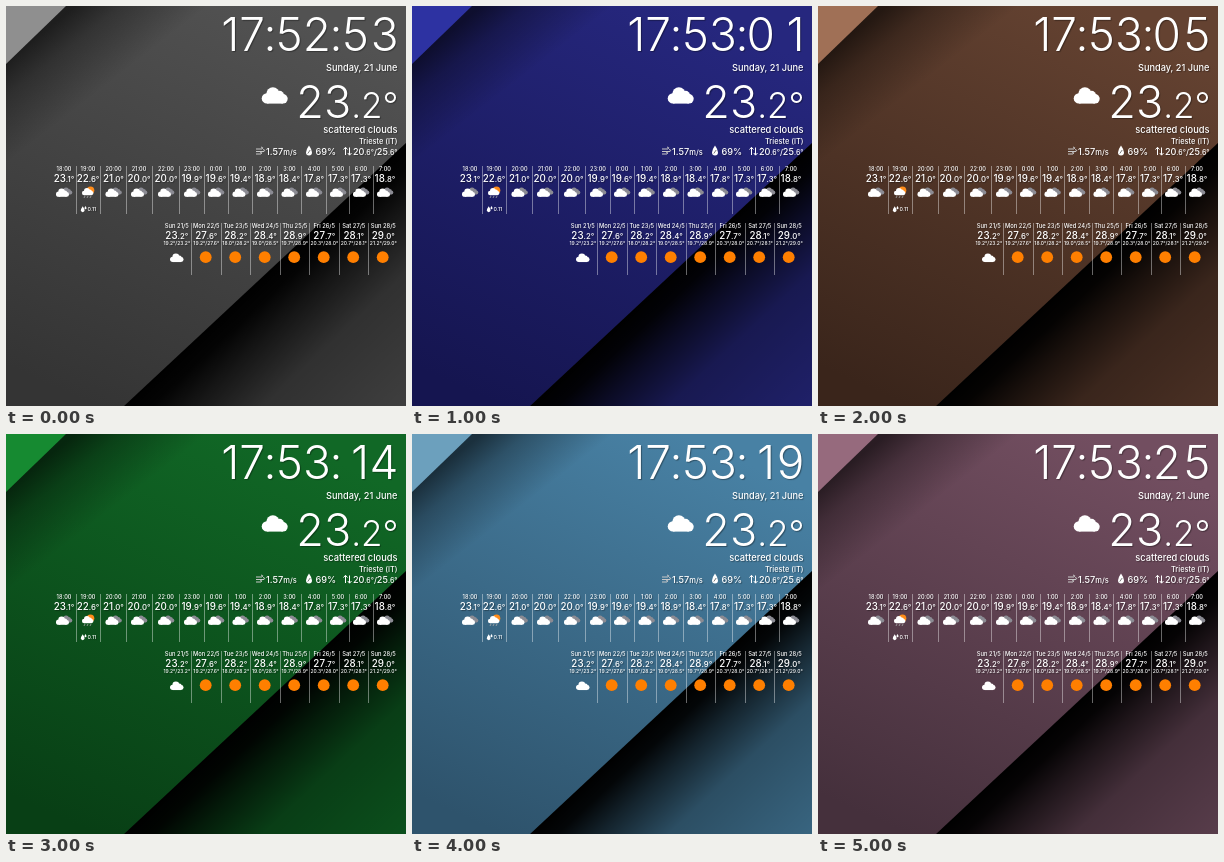
Animation of 400x400 px, one loop 6000 ms. Source, as an HTML page with a canvas:

```html
<!DOCTYPE html>
<html lang="en">
<head>
<meta charset="utf-8">
<title>Weather clock</title>
<style>
  html, body { margin: 0; width: 100%; height: 100%; overflow: hidden; background: #000; }
  canvas { display: block; width: 400px; height: 400px; }
</style>
</head>
<body>
<canvas id="stage" width="400" height="400"></canvas>
<script>
const ctx = document.getElementById('stage').getContext('2d');
const FAMILY = 'Inter, "Open Sans", sans-serif';
const STEP = 1000;

// Each scene: clock, then wallpaper colours for corner, band top, band bottom, lower right.
const scenes = [
  ['17:52:53', '#8f8f8f', '#525252', '#343434', '#3e3e3e'],
  ['17:53:01', '#2d32a2', '#26277e', '#151550', '#1f2068'],
  ['17:53:05', '#a07056', '#644231', '#3a251b', '#4a3024'],
  ['17:53:14', '#168a31', '#116826', '#083f15', '#0b4f1c'],
  ['17:53:19', '#6ca0bd', '#4881a4', '#2e536c', '#38647f'],
  ['17:53:25', '#966a7d', '#724e60', '#45303c', '#573c4a'],
];

const hourCenters = [58, 82, 107.5, 133, 160, 186, 210, 234.5, 259, 283.5, 308, 332, 355, 379];
const hourTemps = '23.1 22.6 21.0 20.0 20.0 19.9 19.6 19.4 18.9 18.4 17.8 17.3 17.3 18.8'.split(' ');
const days = [
  ['Sun 21/5', '23.2', '19.2°/23.2°'], ['Mon 22/5', '27.6', '19.2°/27.6°'],
  ['Tue 23/5', '28.2', '18.0°/28.2°'], ['Wed 24/5', '28.4', '19.0°/28.5°'],
  ['Thu 25/5', '28.9', '19.7°/28.9°'], ['Fri 26/5', '27.7', '20.3°/28.0°'],
  ['Sat 27/5', '28.1', '20.7°/28.1°'], ['Sun 28/5', '29.0', '21.2°/29.0°'],
];

function gradient(x0, y0, x1, y1, ...stops) {
  const g = ctx.createLinearGradient(x0, y0, x1, y1);
  for (const [at, color] of stops) g.addColorStop(at, color);
  return g;
}

const shade = alpha => `rgba(0,0,0,${alpha})`;

function polygon(fill, ...points) {
  ctx.fillStyle = fill;
  ctx.beginPath();
  for (const [x, y] of points) ctx.lineTo(x, y);
  ctx.fill();
}

function disc(x, y, r, color) {
  ctx.fillStyle = color;
  ctx.beginPath();
  ctx.arc(x, y, r, 0, Math.PI * 2);
  ctx.fill();
}

function text(str, x, y, size, align = 'right', weight = 450) {
  ctx.save();
  ctx.shadowColor = shade(.35);
  ctx.shadowOffsetX = ctx.shadowOffsetY = 1;
  ctx.shadowBlur = 1;
  ctx.font = `${weight} ${size}px ${FAMILY}`;
  ctx.textAlign = align;
  ctx.fillStyle = '#fff';
  ctx.fillText(str, x, y);
  ctx.restore();
}

// Runs of [string, size] on one baseline; anchor 0 = left, 0.5 = centre, 1 = right.
function runs(parts, x, y, anchor, weight = 450) {
  const widths = parts.map(([str, size]) => {
    ctx.font = `${weight} ${size}px ${FAMILY}`;
    return ctx.measureText(str).width;
  });
  x -= anchor * widths.reduce((a, b) => a + b);
  parts.forEach(([str, size], i) => {
    text(str, x, y, size, 'left', weight);
    x += widths[i];
  });
}

function degrees(value, big, small) {
  const [whole, tenth] = value.split('.');
  return [[whole, big], [`.${tenth}°`, small]];
}

function line(color, width, ...points) {
  ctx.strokeStyle = color;
  ctx.lineWidth = width;
  ctx.beginPath();
  for (const [x, y] of points) ctx.lineTo(x, y);
  ctx.stroke();
}

function divider(x, top, bottom) {
  line('rgba(255,255,255,.4)', 1, [Math.floor(x) + .5, top], [Math.floor(x) + .5, bottom]);
}

// Cloud centred on x, y; w is its full width.
function cloud(x, y, w, color) {
  ctx.save();
  ctx.translate(x, y);
  ctx.scale(w / 26, w / 26);
  disc(-7.8, 3, 5.2, color);
  disc(-1.8, -1.6, 6.6, color);
  disc(4.8, 0, 4.6, color);
  disc(8.2, 3.4, 4.8, color);
  ctx.fillRect(-7.8, 0, 16, 8.2);
  ctx.restore();
}

function drop(x, y, r) {
  ctx.fillStyle = '#fff';
  ctx.beginPath();
  ctx.moveTo(x, y - 2 * r);
  ctx.quadraticCurveTo(x + r, y - r * .6, x + r, y + r * .3);
  ctx.arc(x, y + r * .3, r, 0, Math.PI);
  ctx.quadraticCurveTo(x - r, y - r * .6, x, y - 2 * r);
  ctx.fill();
}

function wallpaper(corner, top, bottom, dark) {
  polygon(gradient(270, 0, 90, 400, [0, top], [1, bottom]), [0, 0], [400, 0], [400, 400], [0, 400]);
  polygon(gradient(24, 36, 74, 100, [0, shade(.6)], [.35, shade(.32)], [1, shade(0)]),
    [0, 0], [400, 0], [0, 400]);
  polygon(corner, [0, 0], [60, 0], [0, 58]);

  const lowerRight = [[400, 137], [400, 400], [118, 400]];
  polygon(dark, ...lowerRight);
  polygon(gradient(259, 268.5, 388, 407, [0, shade(1)], [.1, shade(.94)], [.25, shade(.65)],
    [.5, shade(.22)], [1, shade(0)]), ...lowerRight);
}

function clock(time) {
  const size = 46, base = 45.3, weight = 350;
  const [hours, minutes, seconds] = time.split(':');
  text(hours, 259, base, size, 'right', weight);
  text(minutes, 297.5, base, size, 'center', weight);
  for (const x of [264, 330]) text(':', x, base, size, 'center', weight);
  text(seconds[0], 363, base, size, 'right', weight);
  text(seconds[1], 392.5, base, size, 'right', weight);
}

function current() {
  text('Sunday, 21 June', 391.5, 64.8, 9.2);
  cloud(268.7, 89.4, 26, '#fff');
  runs(degrees('23.2', 45, 35), 392.5, 112, 1, 350);
  text('scattered clouds', 391.5, 126.8, 9.3);
  text('Trieste (IT)', 391.5, 138, 7.4);

  for (const [y, end] of [[143, 256], [145.5, 258], [148, 255]]) {
    line('#c8c8c8', 1, [250, y], [end, y], [end + .8, y - 1.2], [end - 1, y - 2]);
  }
  runs([['1.57', 9.2], ['m/s', 7.5]], 260, 148.6, 0);
  drop(303, 145.6, 3);
  line(shade(.65), .8, [301.8, 147.5], [304.2, 144]);
  text('69%', 309.5, 148.6, 9.2, 'left');
  line('#fff', 1, [339.5, 141.5], [339.5, 149]);
  line('#fff', 1, [337.5, 143.5], [339.5, 141.3], [341.5, 143.5]);
  line('#fff', 1, [343.5, 141.5], [343.5, 149]);
  line('#fff', 1, [341.8, 147], [343.5, 149.2], [345.5, 147]);
  runs([...degrees('20.6', 9.1, 7), ['/', 8], ...degrees('25.6', 9.1, 7)], 391.5, 148.6, 1);
}

function hourly() {
  hourCenters.forEach((x, i) => {
    text(`${(18 + i) % 24}:00`, x, 165, 5.6, 'center');
    runs(degrees(hourTemps[i], 9.8, 7.8), x, 175.6, .5);
    if (i === 1) {
      disc(x + 2.5, 184.2, 3.8, '#ff8c1a');
      cloud(x - .3, 185.6, 11.5, '#fff');
      for (const dx of [-3, 0, 3]) line('#aaa', .8, [x + dx, 190], [x + dx - 1, 192]);
    } else {
      cloud(x + 2.8, 185, 11, '#8b8b93');
      cloud(x - 1.5, 186.7, 13, '#fff');
    }
    if (i) divider((x + hourCenters[i - 1]) / 2, 160, 208);
  });
  drop(76.7, 203.8, 1.8);
  drop(79.5, 202, 1);
  text('0.11', 81.5, 205.4, 5.3, 'left');
}

function daily() {
  days.forEach(([label, temp, range], i) => {
    const x = 170.8 + i * 29.5;
    text(label, x, 222, 5.8, 'center');
    runs(degrees(temp, 9.8, 7.8), x, 233, .5);
    text(range, x, 239.4, 5, 'center');
    if (i) {
      disc(x - .6, 251.2, 5.9, '#ff7f00');
      divider(x - 14.7, 217, 269);
    } else {
      cloud(x, 251.8, 13.5, '#fff');
    }
  });
}

function frame() {
  const index = Math.floor(performance.now() / STEP) % scenes.length;
  const [time, ...colors] = scenes[index];
  wallpaper(...colors);
  clock(time);
  current();
  hourly();
  daily();
  requestAnimationFrame(frame);
}
requestAnimationFrame(frame);
</script>
</body>
</html>
```
